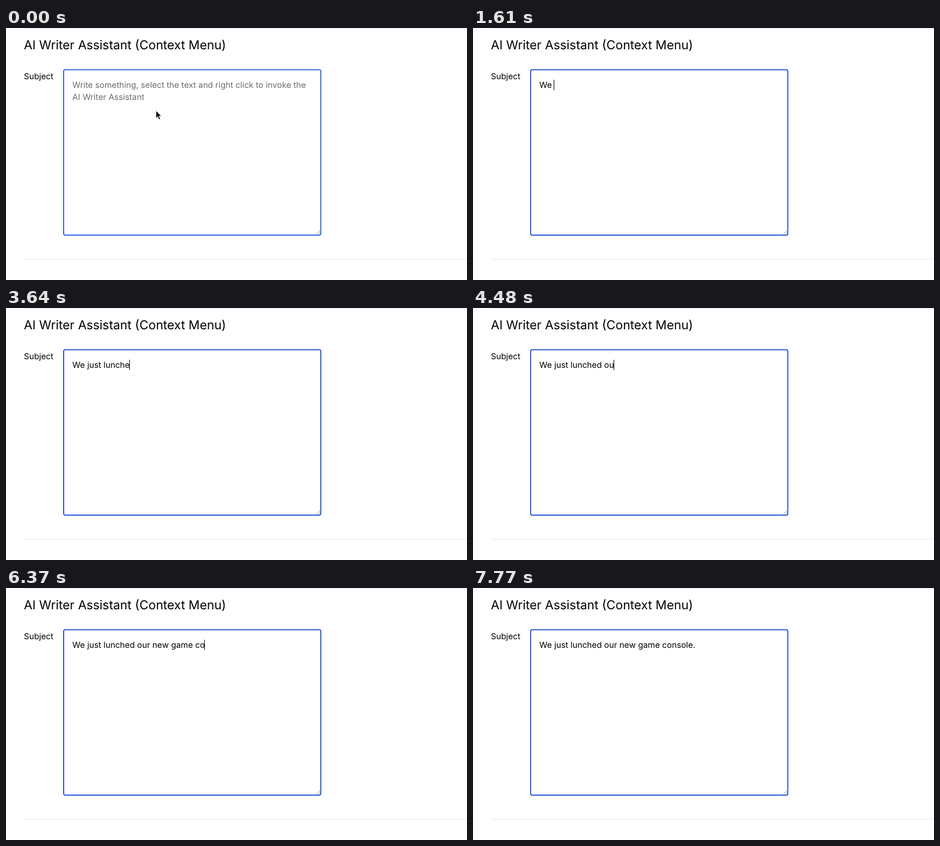
Animation of 800x438 px, one loop 8000 ms. Source, as an HTML page:

```html
<!DOCTYPE html>
<html lang="en">
<head>
<meta charset="utf-8">
<title>AI Writer Assistant</title>
<style>
  html, body { margin: 0; width: 100%; height: 100%; overflow: hidden; background: #fff; }
  svg { display: block; width: 100vw; height: 100vh; }
  text {
    font: 400 14.37px Inter, "Noto Sans", sans-serif;
    font-optical-sizing: none;
    text-rendering: geometricPrecision;
    white-space: pre;
  }
  .title { font-size: 21.46px; }
  .hint { fill: #6c6c6c; }
</style>
</head>
<body>
<svg viewBox="0 0 800 438">
  <path d="M31 .5H800M31 401.5H800" stroke="#e8e8e8"/>
  <text class="title" x="31" y="36.8">AI Writer Assistant (Context Menu)</text>
  <text x="31" y="88.6">Subject</text>

  <rect id="box" x="100" y="72.5" width="446.3" height="287.6" rx="3" fill="#fff" stroke-width="2"/>
  <path d="M538.5 358.5l7-7M542.5 358.5l3-3" stroke="#777" stroke-width=".8"/>

  <g id="hint">
    <text class="hint" x="115.1" y="103.8">Write something, select the text and right click to invoke the</text>
    <text class="hint" x="115.1" y="125.1">AI Writer Assistant</text>
    <g transform="translate(260.2 143.6)">
      <path d="M0 0V13.2L3 10.4L5.2 15.4L7.6 14.4L5.4 9.5H9.4Z" opacity=".2" transform="translate(.3 1)"/>
      <path d="M0 0V13.2L3 10.4L5.2 15.4L7.6 14.4L5.4 9.5H9.4Z" stroke="#fff" stroke-width=".9"/>
    </g>
  </g>

  <text id="typed" x="115.1" y="103.8" xml:space="preserve"></text>
  <rect id="caret" y="89.5" width="1" height="18" shape-rendering="crispEdges"/>
</svg>
<script>
  const LOOP = 8000, LEFT = 115.1, HOLD = 560;

  // Each word is typed at an even pace between its first and last key
  const words = [
    { text: "We ", from: 1120, to: 1610 },
    { text: "just ", from: 1890, to: 2380 },
    { text: "lunched ", from: 2730, to: 3850 },
    { text: "our ", from: 4270, to: 4760 },
    { text: "new ", from: 4970, to: 5250 },
    { text: "game ", from: 5530, to: 5950 },
    { text: "console.", from: 6230, to: 7210 }
  ];
  const message = words.map(w => w.text).join("");
  const keys = words.flatMap(({ text, from, to }) =>
    [...text].map((_, i) => from + (to - from) * i / (text.length - 1)));

  const [box, hint, typed, caret] =
    ["box", "hint", "typed", "caret"].map(id => document.getElementById(id));
  const show = (el, on) => el.setAttribute("visibility", on ? "visible" : "hidden");
  const mix = (a, b, p) => a + (b - a) * p;

  function draw(t) {
    const count = keys.filter(k => k <= t).length;
    typed.textContent = message.slice(0, count);
    const width = count ? typed.getComputedTextLength() : 0;
    caret.setAttribute("x", Math.round(LEFT + width - 0.7));
    show(hint, count === 0);

    // The caret stays lit for a moment after each key
    show(caret, count ? t - keys[count - 1] < HOLD : t >= 140 && t < 630);

    // The focus outline settles to a deeper blue
    const p = Math.min(1, Math.max(0, (t - 70) / 210));
    box.setAttribute("stroke", `rgb(${mix(56, 49, p)}, ${mix(112, 95, p)}, ${mix(226, 208, p)})`);
  }

  const start = performance.now();
  function frame() {
    draw((performance.now() - start) % LOOP);
    requestAnimationFrame(frame);
  }
  frame();
</script>
</body>
</html>
```
